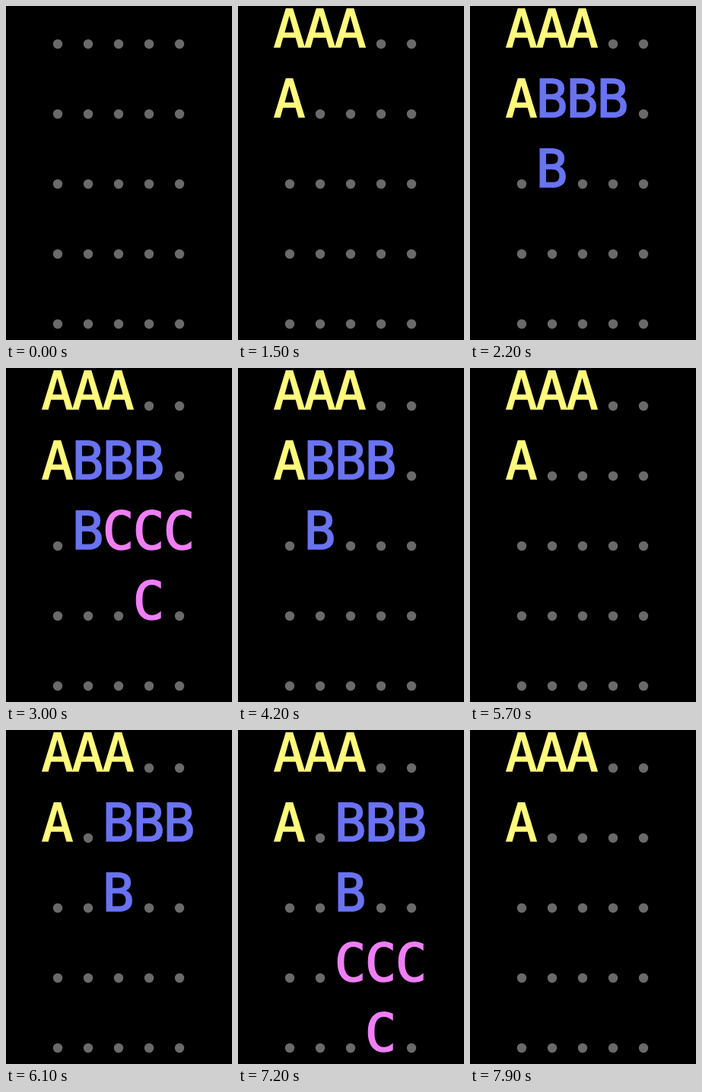
Recreate the animation shown at these times as an HTML page. Size 297 px wide and 439 px high, loop 8 s.

```html
<!DOCTYPE html>
<html lang="en">
<head>
<meta charset="utf-8">
<title>Tile placement search</title>
<style>
  html, body { margin: 0; width: 100%; height: 100%; overflow: hidden; background: #000; }
  svg { display: block; width: 297px; height: 439px; }
  circle { fill: #6a6a6a; }
  text {
    font: 69px "DejaVu Sans Mono", monospace;
    text-anchor: middle;
    text-rendering: geometricPrecision;
    stroke-width: 1.6;
  }
  .A { fill: #fff97d; stroke: #fff97d; }
  .B { fill: #6973f4; stroke: #6973f4; }
  .C { fill: #f07ff6; stroke: #f07ff6; }
</style>
</head>
<body>
<svg id="board" viewBox="0 0 297 439"></svg>
<script>
const LOOP = 8000, SIZE = 5;

// Each tile is three cells in a row plus one below, at this column offset.
const FOOT = { A: 0, B: 0, C: 1 };

// [start in ms, tiles as letter + column + row]
const STEPS = [
  [0, ""],
  [1500, "A00"],
  [2200, "A00 B11"],
  [2700, "A00 B11 C22"],
  [4200, "A00 B11"],
  [5300, "A00 B11 C23"],
  [5700, "A00"],
  [6100, "A00 B21"],
  [7200, "A00 B21 C23"],
  [7700, "A00"]
];

const board = document.getElementById("board");

function add(tag, attrs) {
  const el = document.createElementNS("http://www.w3.org/2000/svg", tag);
  for (const name in attrs) el.setAttribute(name, attrs[name]);
  return board.appendChild(el);
}

const cells = Array.from({ length: SIZE * SIZE }, (_, i) => {
  const x = 68 + 40 * (i % SIZE), y = 50 + 92 * Math.floor(i / SIZE);
  return {
    dot: add("circle", { cx: x, cy: y, r: 6.2 }),
    letter: add("text", { x: x - 0.4, y: y + 4 })
  };
});

function layout(tiles) {
  const grid = [];
  for (const [name, col, row] of tiles.split(" ").filter(Boolean)) {
    const start = +row * SIZE + +col;
    for (const offset of [0, 1, 2, SIZE + FOOT[name]]) grid[start + offset] = name;
  }
  return grid;
}

let shown = null;

function draw(now) {
  const t = now % LOOP;
  const step = STEPS.filter(s => s[0] <= t).pop();
  if (step !== shown) {
    shown = step;
    const grid = layout(step[1]);
    cells.forEach(({ dot, letter }, i) => {
      const name = grid[i] || "";
      letter.textContent = name;
      letter.setAttribute("class", name);
      dot.setAttribute("visibility", name ? "hidden" : "visible");
    });
  }
  requestAnimationFrame(() => draw(performance.now() - origin));
}

const origin = performance.now();
draw(0);
</script>
</body>
</html>
```
